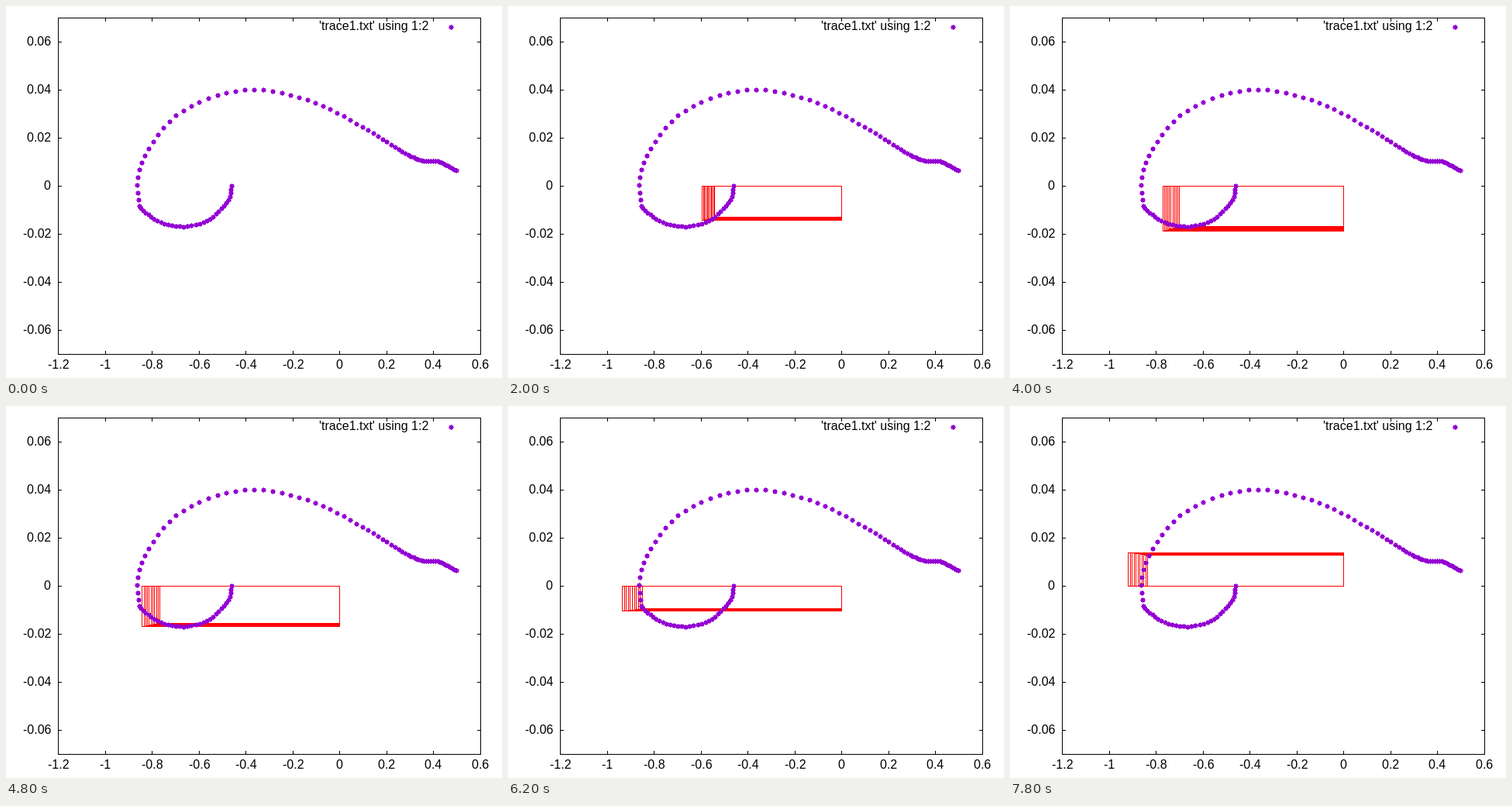
Write an HTML page with a canvas that moves like this. It is 640x480 px and loops after 8000 ms.

```html
<!DOCTYPE html>
<html lang="en">
<head>
<meta charset="utf-8">
<title>Trace plot</title>
<style>
  html, body { margin: 0; width: 100%; height: 100%; overflow: hidden; background: #fff; }
  canvas { display: block; }
</style>
</head>
<body>
<canvas id="stage" width="640" height="480"></canvas>
<script>
const ctx = document.getElementById('stage').getContext('2d');
const LOOP = 8000, STEP = 200, POINTS = 101;
const ORIGIN = { x: 430.5, y: 231.8 };
const PLOT = { left: 67, right: 612, top: 15, bottom: 449 };

// Knots of the trace: point index, x, y. Close knots make the two bends.
const knots = [
  [0, 291, 232], [3, 288.5, 246], [6, 281, 258], [12, 259.2, 277], [18, 229.2, 284.5],
  [24, 199.5, 279.3], [30, 176.8, 263.8], [32, 172, 257.5],
  [33, 170.5, 250.2], [36, 170.3, 220.8], [40, 183.5, 183.8], [46, 228.5, 135],
  [53, 308, 108], [60, 389, 121], [68, 460, 156], [76, 506.5, 185], [84, 535.5, 199],
  [91, 557, 200], [93, 561.5, 202], [100, 581, 212]
];

function slope(i, axis) {
  const before = knots[Math.max(i - 1, 0)];
  const after = knots[Math.min(i + 1, knots.length - 1)];
  return (after[axis] - before[axis]) / (after[0] - before[0]);
}

// Cubic Hermite interpolation between the knots around an index.
function spline(index, axis) {
  const next = Math.max(1, knots.findIndex(knot => knot[0] >= index));
  const a = knots[next - 1], b = knots[next];
  const span = b[0] - a[0], t = (index - a[0]) / span, u = 1 - t;
  return u * u * (1 + 2 * t) * a[axis] + t * t * (1 + 2 * u) * b[axis]
    + span * t * u * (u * slope(next - 1, axis) - t * slope(next, axis));
}

const trace = Array.from({ length: POINTS }, (_, i) => ({ x: spline(i, 1), y: spline(i, 2) }));

// Text starts on a whole pixel; align is the share of its width left of x.
function drawText(text, x, y, align) {
  ctx.fillText(text, Math.round(x - ctx.measureText(text).width * align), y);
}

function drawAxes() {
  ctx.strokeStyle = ctx.fillStyle = '#000';
  ctx.font = '16px "Liberation Sans", Arial, sans-serif';
  const { left, right, top, bottom } = PLOT;
  ctx.strokeRect(left + 0.5, top + 0.5, right - left, bottom - top);

  for (let i = 0; i <= 9; i++) {
    const x = Math.round(left + (right - left) * i / 9);
    ctx.fillRect(x, top, 1, 5);
    ctx.fillRect(x, bottom - 4, 1, 5);
    drawText(String((i - 6) / 5), x + 0.5, 468, 0.5);
  }
  for (let i = -3; i <= 3; i++) {
    const y = 232 - i * 62;
    ctx.fillRect(left, y, 5, 1);
    ctx.fillRect(right - 4, y, 5, 1);
    drawText(String(i / 50), 58, y + 5, 1);
  }
  drawText("'trace1.txt' using 1:2", 545, 31, 1);
}

function drawDot(x, y) {
  ctx.fillRect(x - 3, y, 7, 1);
  ctx.fillRect(x - 2, y - 2, 5, 5);
  ctx.fillRect(x, y - 3, 1, 7);
}

// Nested boxes from the origin to scaled copies of one trace point.
function drawBoxes(point) {
  ctx.strokeStyle = '#f00';
  const right = 430, base = Math.round(ORIGIN.y);
  for (let i = 0; i <= 10; i++) {
    const scale = 1.005 + i / 100;
    const x = Math.round(ORIGIN.x + (point.x - ORIGIN.x) * scale);
    const y = Math.round(ORIGIN.y + (point.y - ORIGIN.y) * scale);
    ctx.strokeRect(x + 0.5, Math.min(y, base) + 0.5, right - x, Math.abs(y - base));
  }
}

function draw(time) {
  const index = Math.floor((time % LOOP) / STEP);
  ctx.fillStyle = '#fff';
  ctx.fillRect(0, 0, 640, 480);
  ctx.lineWidth = 1;
  if (index > 0) drawBoxes(trace[index]);
  drawAxes();
  ctx.fillStyle = '#9400d3';
  for (const { x, y } of trace) drawDot(Math.round(x), Math.round(y));
  drawDot(574, 27);
}

const start = performance.now();
function tick() {
  draw(performance.now() - start);
  requestAnimationFrame(tick);
}
tick();
</script>
</body>
</html>
```
